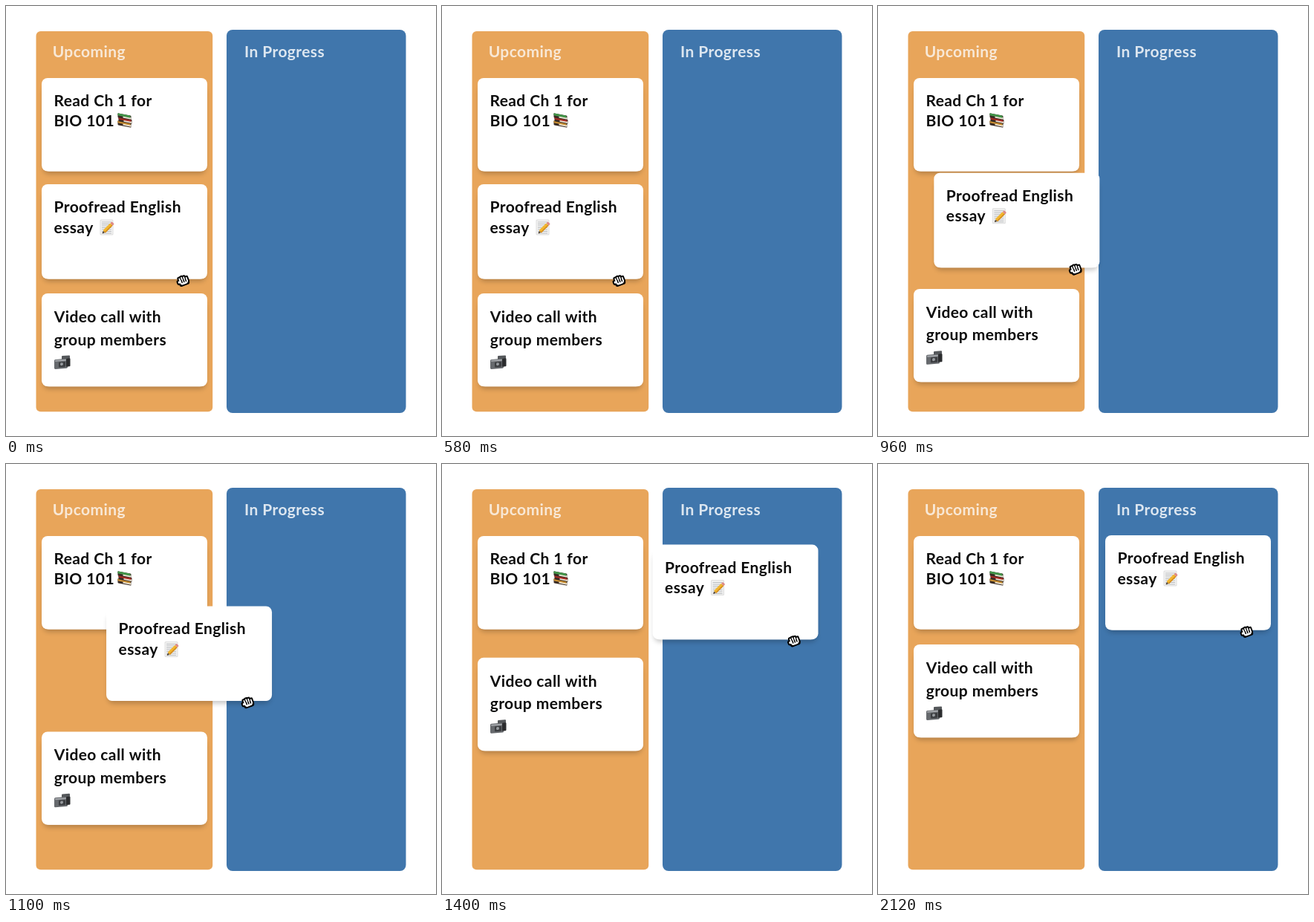
An HTML page with a canvas for the animation above (3340 ms loop, 579x579 px).

```html
<!DOCTYPE html>
<html lang="en">
<head>
<meta charset="utf-8">
<title>Task board</title>
<style>
html, body { margin: 0; width: 100%; height: 100%; overflow: hidden; background: #fff; }
canvas { display: block; width: 579px; height: 579px; }
</style>
</head>
<body>
<canvas id="board"></canvas>
<script>
const SIZE = 579, LOOP = 3340;
const canvas = document.getElementById('board');
const ctx = canvas.getContext('2d');
const dpr = window.devicePixelRatio || 1;
canvas.width = canvas.height = Math.round(SIZE * dpr);

// Symmetric power easing, progress clamped to 0..1
function easeInOut(t, start, length, power) {
  const u = Math.min(1, Math.max(0, (t - start) / length));
  const k = 2 ** (power - 1);
  return u < 0.5 ? k * u ** power : 1 - k * (1 - u) ** power;
}

function box(x, y, w, h, r, fill) {
  ctx.fillStyle = fill;
  ctx.beginPath();
  ctx.roundRect(x, y, w, h, r);
  ctx.fill();
}

function label(text, x, y, color = '#0c0c0c') {
  ctx.font = '700 21px Lato, "Open Sans", sans-serif';
  ctx.letterSpacing = '0.4px';
  ctx.fillStyle = color;
  ctx.fillText(text, x, y);
}

function at(x, y, draw) {
  ctx.save();
  ctx.translate(x, y);
  draw();
  ctx.restore();
}

function cardBase(h) {
  ctx.save();
  ctx.shadowColor = 'rgba(0,0,0,0.22)';
  ctx.shadowBlur = 6 * dpr;
  ctx.shadowOffsetY = 3.5 * dpr;
  box(2, 8, 219, h - 8, 8, '#fff');
  ctx.restore();
  box(0, 0, 223, h, 8, '#fff');
}

// Three slanted books, each a cover over a strip of pages
function books() {
  ctx.transform(1, 0.2, 0, 1, 0, 0);
  ['#c98f32', '#a92b26', '#43964a'].forEach((color, i) => {
    const x = 1 + (i % 2), y = 10 - 5 * i;
    box(x, y, 18, 6, 1, '#392b24');
    box(x + 7, y + 2.5, 11, 2.5, 0, '#eee6d6');
    box(x, y, 17, 3.2, 1, color);
  });
}

function memo() {
  box(0.5, 0, 18, 21, 1.5, '#dedede');
  box(1.5, 1, 16, 19, 1, '#f2f2f1');
  for (let y = 3; y < 19; y += 2.5) box(3, y, 13, 1, 0, '#babdc1');
  at(4, 18.5, () => {
    ctx.rotate(-Math.PI / 4);
    box(0, -1, 5, 2, 1, '#55483a');
    box(3, -2.3, 14, 4.6, 1, '#f2b62f');
    box(3, 0.8, 14, 1.5, 0, '#d58b1d');
    box(17, -2.3, 3, 4.6, 1, '#de8a86');
  });
}

function camcorder() {
  ctx.transform(1, -0.08, 0, 1, 0, 2);
  box(10, 0, 11, 6, 1, '#55585b');
  box(0, 4, 18, 13, 1.5, '#66696d');
  box(1, 5, 15, 2, 1, '#a3a6aa');
  box(6, 8, 9, 7, 1, '#3c3e41');
  box(8, 9, 4, 4, 2, '#989ca0');
  box(16, 4, 5.5, 11, 1, '#2b2c2e');
}

// Closed hand: knuckles, thumb and palm, outlined as one shape
function hand() {
  ctx.rotate(-0.35);
  for (const [grow, color] of [[1, '#000'], [-0.9, '#fff']]) {
    for (let i = 0; i < 4; i++) {
      const top = -5.8 + 0.6 * (i - 1) ** 2;
      box(-5 + 3.1 * i - grow, top - grow, 3.6 + 2 * grow, 8 + 2 * grow, 2, color);
    }
    box(-7.3 - grow, -1.5 - grow, 5 + 2 * grow, 5 + 2 * grow, 2.5, color);
    box(-5 - grow, -2 - grow, 12.4 + 2 * grow, 8.6 + 2 * grow, 3, color);
  }
  for (let i = 0; i < 3; i++) box(-2 + 2.8 * i, -1.2, 1.5, 4.6, 0.7, '#000');
}

function render(t) {
  ctx.setTransform(dpr, 0, 0, dpr, 0, 0);
  ctx.fillStyle = '#fff';
  ctx.fillRect(0, 0, SIZE, SIZE);

  box(40.5, 34, 237.7, 512.3, 6, '#e8a55a');
  box(297, 32, 241.5, 516, 8, '#4076ac');
  label('Upcoming', 62.7, 69, '#f8e8d6');
  label('In Progress', 321, 69, '#dce6f0');

  const drag = easeInOut(t, 806, 734, 1.8);
  const lift = easeInOut(t, 647, 1165, 4);

  at(48, 97, () => {
    cardBase(125.5);
    label('Read Ch 1 for', 16.5, 38);
    label('BIO 101', 16.5, 65);
    at(101.5, 47, books);
  });
  at(48, 387 - 144 * lift, () => {
    cardBase(125.3);
    label('Video call with', 16.7, 39);
    label('group members', 16.7, 69.5);
    at(17, 83, camcorder);
  });
  at(48 + 258 * drag, 240 - 144 * drag, () => {
    cardBase(127.6);
    label('Proofread English', 16.5, 38);
    label('essay', 16.5, 65.5);
    at(78, 47.5, memo);
    at(189.5, 129.5, hand);
  });
}

const origin = performance.now();
function tick() {
  render((performance.now() - origin) % LOOP);
  requestAnimationFrame(tick);
}
tick();
</script>
</body>
</html>
```
